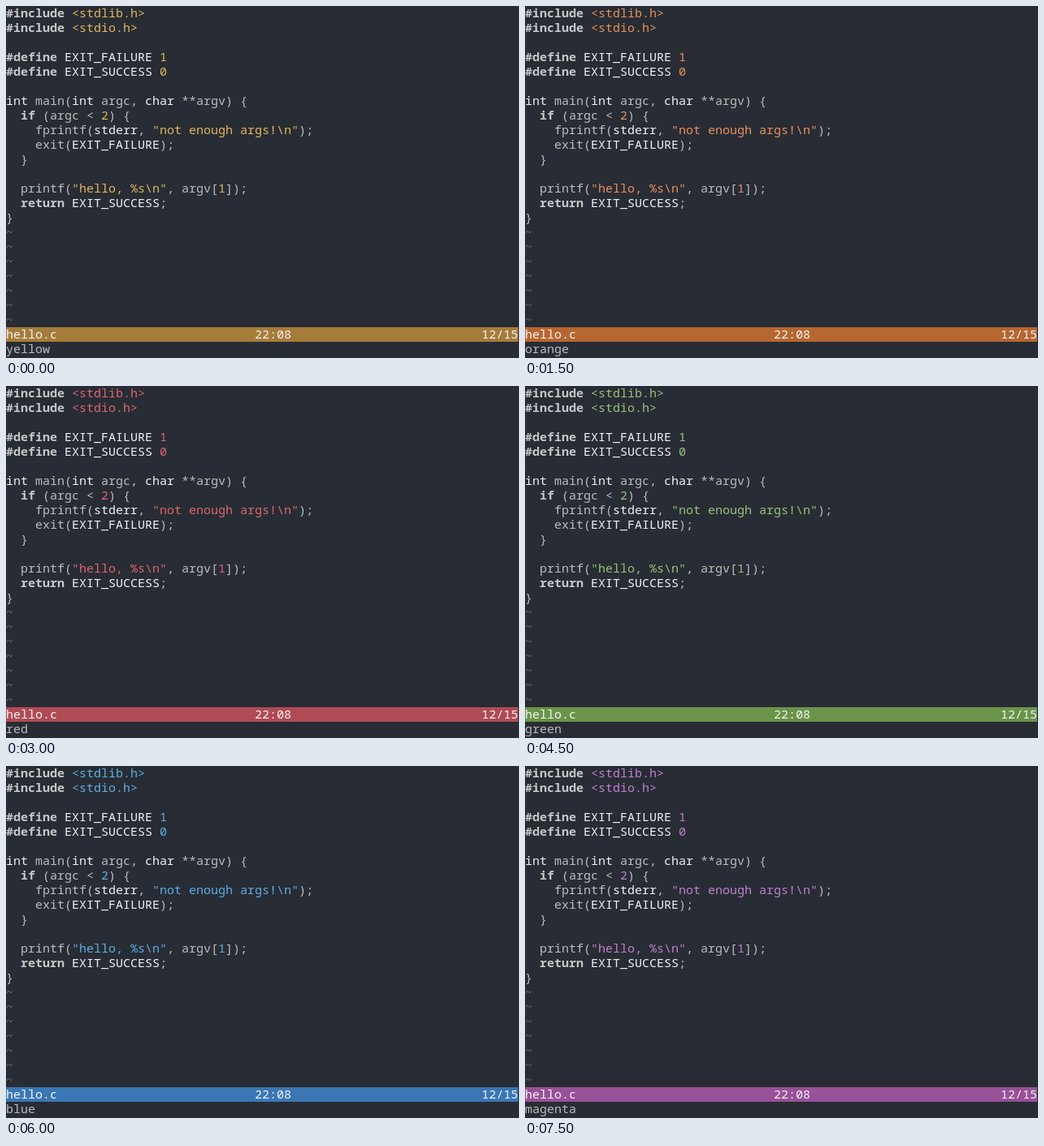
Animation, 631 px wide and 434 px high, one loop 8 s. Source, as an HTML page:

```html
<!DOCTYPE html>
<html lang="en">
<head>
<meta charset="utf-8">
<title>Editor accent colours</title>
<style>
  html, body { margin: 0; width: 100%; height: 100%; overflow: hidden; background: #282c34; }
  pre {
    position: absolute; left: 0; margin: 0;
    font: 15px/18px "Noto Sans Mono", "DejaVu Sans Mono", monospace;
    color: #bcbcbc;
  }
  #code { top: -1px; }
  #bar { position: absolute; top: 396px; left: 0; width: 630px; height: 18px; background: var(--bar); }
  #status { top: 395px; color: #f4f4f4; }
  #message { top: 413px; }
  b { font-weight: 700; color: #c8c8c8; }
  i { font-style: normal; color: #f0f0f0; }
  u { text-decoration: none; color: var(--accent); }
  s { text-decoration: none; color: #686b70; }
</style>
</head>
<body>
<pre id="code"><b>#include</b> <u>&lt;stdlib.h&gt;</u>
<b>#include</b> <u>&lt;stdio.h&gt;</u>

<b>#define</b> <i>EXIT_FAILURE</i> <u>1</u>
<b>#define</b> <i>EXIT_SUCCESS</i> <u>0</u>

<i>int</i> main(<i>int</i> argc, <i>char</i> **argv) {
  <b>if</b> (argc &lt; <u>2</u>) {
    fprintf(<i>stderr</i>, <u>"not enough args!\n"</u>);
    exit(<i>EXIT_FAILURE</i>);
  }

  printf(<u>"hello, %s\n"</u>, argv[<u>1</u>]);
  <b>return</b> <i>EXIT_SUCCESS</i>;
}
<s>~
~
~
~
~
~
~</s></pre>
<div id="bar"></div>
<pre id="status"></pre>
<pre id="message"></pre>
<script>
const LOOP = 8000, HOLD = 1500;
const themes = [
  { name: "yellow",  accent: "#e2b55f", bar: "#a67c3a" },
  { name: "orange",  accent: "#e8905c", bar: "#b66731" },
  { name: "red",     accent: "#dc6670", bar: "#b04b55" },
  { name: "green",   accent: "#98c379", bar: "#6a944a" },
  { name: "blue",    accent: "#5caee4", bar: "#3a77b4" },
  { name: "magenta", accent: "#c07fd0", bar: "#985098" },
];
const root = document.documentElement.style;
const message = document.getElementById("message");
document.getElementById("status").textContent =
  "hello.c".padEnd(34) + "22:08".padEnd(31) + "12/15";

let shown;
function show(theme) {
  if (theme === shown) return;
  shown = theme;
  root.setProperty("--accent", theme.accent);
  root.setProperty("--bar", theme.bar);
  message.textContent = theme.name;
}

const start = performance.now();
function tick() {
  const time = (performance.now() - start) % LOOP;
  show(themes[Math.floor(time / HOLD)]);
  requestAnimationFrame(tick);
}
tick();
</script>
</body>
</html>
```
